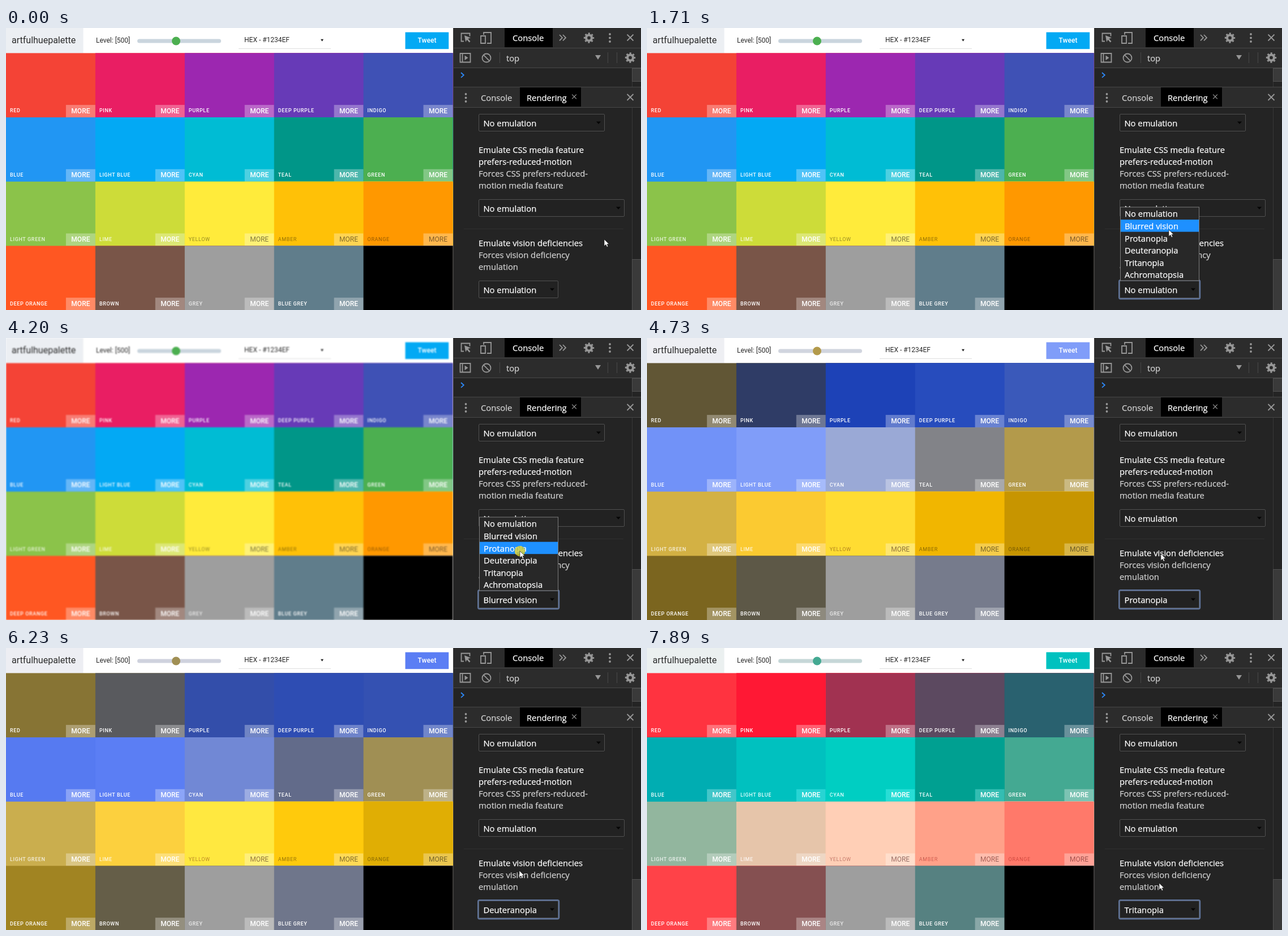
Animation of 1122x499 px, one loop 8000 ms. Source, as an HTML page:

```html
<!DOCTYPE html>
<html lang="en">
<head>
<meta charset="utf-8">
<title>Vision deficiency emulation</title>
<style>
html, body { margin: 0; width: 100%; height: 100%; overflow: hidden; background: #242424; }
svg { display: block; width: 1122px; height: 499px; }
text { white-space: pre; }
.page text { font-family: Roboto, sans-serif; font-size: 12px; fill: #2b2b2b; }
.page .name { font-size: 9px; font-weight: 500; letter-spacing: .64px; fill: #fff; }
.page .more { font-weight: 500; fill: #fff; text-anchor: middle; }
.page .soft { fill: rgba(255, 255, 255, .8); }
.page .dark { fill: rgba(0, 0, 0, .5); font-weight: 400; }
.page .name.dark { fill: rgba(0, 0, 0, .42); }
.tools text { font-family: "Open Sans", "Noto Sans", sans-serif; font-size: 14.75px; fill: #fff; stroke: #fff; stroke-width: .25; }
.tools .dim { fill: #d2d2d2; stroke: #d2d2d2; }
.icon { fill: none; stroke: #979797; stroke-width: 1.8; }
.solid { fill: #979797; }
</style>
</head>
<body>
<svg viewBox="0 0 1122 499">
  <defs id="filters"></defs>
  <rect width="790" height="499" fill="#fff"/>
  <g class="page" id="page"></g>
  <g class="tools">
    <g id="panel"></g>
    <g id="select"></g>
    <g id="menu"></g>
    <circle id="press" r="9.3" fill="#d8cf30" opacity=".8"/>
    <path id="pointer" d="M0 0V11.8L2.9 9.2 4.8 13.4 6.8 12.5 5 8.5H8.6Z" fill="#fff" stroke="#111" stroke-width=".6"/>
  </g>
</svg>
<script>
const $ = id => document.getElementById(id);
const rect = (x, y, w, h, fill, extra = '') =>
  `<rect x="${x}" y="${y}" width="${w}" height="${h}" fill="${fill}" ${extra}/>`;
const text = (x, y, s, cls = '', extra = '') =>
  `<text x="${x}" y="${y}" class="${cls}" ${extra}>${s}</text>`;
const path = (d, cls = 'icon', extra = '') => `<path d="${d}" class="${cls}" ${extra}/>`;
const circle = (x, y, r, cls = 'solid', extra = '') =>
  `<circle cx="${x}" cy="${y}" r="${r}" class="${cls}" ${extra}/>`;

// Colour vision filters
const matrices = {
  protanopia: [.152286, 1.052583, -.204868, .114503, .786281, .099216, -.003882, -.048116, 1.051998],
  deuteranopia: [.367322, .860646, -.227968, .280085, .672501, .047413, -.01182, .04294, .968881],
  tritanopia: [1.255528, -.076749, -.178779, -.078411, .930809, .147602, .004733, .691367, .3039]
};
const filter = (id, body) => `<filter id="${id}" filterUnits="userSpaceOnUse" x="0" y="0"
  width="790" height="499" color-interpolation-filters="sRGB">${body}</filter>`;
$('filters').innerHTML = filter('blurred', '<feGaussianBlur stdDeviation="1.1"/>') +
  Object.entries(matrices).map(([id, m]) => {
    const rows = [0, 3, 6].map(i => m.slice(i, i + 3).join(' ') + ' 0 0');
    return filter(id, `<feColorMatrix values="${rows.join(' ')} 0 0 0 1 0"/>`);
  }).join('');

// Colour page
const swatches = `RED F44336,PINK E91E63,PURPLE 9C27B0,DEEP PURPLE 673AB7,INDIGO 3F51B5,
BLUE 2196F3,LIGHT BLUE 03A9F4,CYAN 00BCD4,TEAL 009688,GREEN 4CAF50,
LIGHT GREEN 8BC34A,LIME CDDC39,YELLOW FFEB3B,AMBER FFC107,ORANGE FF9800,
DEEP ORANGE FF5722,BROWN 795548,GREY 9E9E9E,BLUE GREY 607D8B, 000000`.split(',');
const darkNames = ['YELLOW', 'AMBER', 'ORANGE'];
const softNames = ['LIGHT GREEN', 'LIME', 'GREY'];
const tileW = 157.9, tileH = 113.7, gridTop = 44.4, gridRight = 5 * tileW;

// Each tile runs on below its neighbours, so no seams show between them.
function tile(entry, i) {
  const name = entry.trim().slice(0, -6).trim(), color = '#' + entry.slice(-6);
  const left = i % 5 * tileW, right = left + tileW;
  const top = gridTop + (i / 5 | 0) * tileH, bottom = top + tileH;
  const box = rect(left, top, gridRight - left, 499 - top, color);
  if (!name) return box;
  const dark = darkNames.includes(name) ? ' dark' : '';
  const soft = softNames.includes(name) ? ' soft' : '';
  return box + rect(right - 52, bottom - 22, 52, 22, 'rgba(255,255,255,.3)') +
    text(left + 7, bottom - 8.7, name, 'name' + dark + soft) +
    text(right - 26, bottom - 7.4, 'MORE', 'more' + dark);
}

$('page').innerHTML =
  rect(0, 0, 790, 499, '#fff') +
  rect(0, 0, 136.5, 44.4, '#eceff3') +
  text(10, 27.3, 'artfulhuepalette', '', 'style="font-size:16px"') +
  text(159, 26, 'Level: [500]') +
  rect(232, 19.5, 148, 7, '#cad5de', 'rx="3.5"') +
  circle(300.5, 23, 7.5, '', 'fill="#4caf50"') +
  text(421, 25.3, 'HEX - #1234EF') +
  path('M556 19.8h5l-2.5 4z', '', 'fill="#222"') +
  rect(411, 36, 163, 1, '#dedede') +
  rect(705.5, 7.5, 76.7, 29.7, '#03a9f4') +
  text(744, 26.2, 'Tweet', 'more') +
  swatches.map(tile).join('');

// Developer tools
const gear = (x, y) =>
  circle(x, y, 5, 'icon', 'style="stroke-width:4.2"') +
  circle(x, y, 7.8, 'icon', 'style="stroke-width:2.8" stroke-dasharray="3.06" stroke-dashoffset="1.53"');
const dots = (x, y) => [-6.5, 0, 6.5].map(d => circle(x, y + d, 1.9)).join('');
const cross = (x, y, r, width = 1.8) =>
  path(`M${x - r} ${y - r}l${2 * r} ${2 * r}m0 ${-2 * r}l${-2 * r} ${2 * r}`, 'icon', `style="stroke-width:${width}"`);
const arrow = (x, y) => path(`M${x - 4} ${y - 2}h8l-4 4.5z`, '', 'fill="#050505"');
const select = (x, y, w, label) =>
  rect(x + .5, y + .5, w - 1, 30, '#222', 'rx="1.5" stroke="#505050"') +
  text(x + 8.5, y + 22, label) + arrow(x + w - 11, y + 15.5);
const lines = (x, y, list, bright) =>
  list.map((s, i) => text(x, y + i * 20.9, s, i < bright ? '' : 'dim')).join('');
const line = (x, y, w, h, color = '#484848') => rect(x, y, w, h, color);

$('panel').innerHTML =
  rect(790, 0, 332, 499, '#242424') +
  rect(790, 0, 332, 70, '#2c2c2c') + rect(790, 105, 332, 35, '#2c2c2c') +
  [35, 70, 104, 140].map(y => line(790, y, 332, 1)).join('') +
  line(790, 0, 1, 499, '#3c3c3c') +
  rect(881, 0, 85, 34, '#000') + rect(908, 105, 108, 34, '#000') +
  // top toolbar
  path('M809 23.5h-4.5v-14h15v5') +
  path('M810 13l11 4.6-4.6 1.5 4.1 4.6-2 1.9-4-4.8-2.3 4z', 'solid') +
  path('M844 12V8h13v19h-7M839 14h8v13h-8z') +
  text(895, 23.4, 'Console') +
  path('M978 12l5 5.2-5 5.2m6-10.4l5 5.2-5 5.2') +
  gear(1030, 17.5) + dots(1067, 17.5) + cross(1103, 17, 5.5) +
  // console toolbar
  path('M802.5 45h18v15.5h-18zM806.5 45v15.5') +
  path('M810.5 48.5v8.5l6-4.25z', 'solid') +
  circle(849, 53, 7.5, 'icon') + path('M843.7 47.7l10.6 10.6') +
  [872, 1063, 1079].map(x => line(x, 43, 1, 19)).join('') +
  text(884, 58.6, 'top', 'dim') + path('M1041 48h10l-5 8z', 'solid') + gear(1103, 52.5) +
  path('M804 79l4.8 4.3-4.8 4.3', 'icon', 'style="stroke:#2d8cff"') +
  // drawer tabs
  dots(812.5, 123.5) + text(839, 129.2, 'Console', 'dim') + text(920, 129.2, 'Rendering') +
  cross(1004, 121.5, 3.8, 1.2) + cross(1103, 122.5, 5.5) +
  // scrollbars
  line(1106, 71, 1, 33, '#383838') + line(1106, 141, 1, 358, '#383838') +
  rect(1106.5, 71.5, 16, 23, '#3a3a3a', 'stroke="#505050"') +
  rect(1106.5, 409.5, 16, 90, '#3a3a3a', 'stroke="#505050"') +
  // rendering settings
  select(835, 152, 223, 'No emulation') +
  lines(835, 221.2, ['Emulate CSS media feature', 'prefers-reduced-motion',
    'Forces CSS prefers-reduced-', 'motion media feature'], 2) +
  select(835, 303, 258, 'No emulation') +
  line(809, 355, 282, 1, '#303030') +
  lines(835, 386.2, ['Emulate vision deficiencies', 'Forces vision deficiency', 'emulation'], 1);

const options = ['No emulation', 'Blurred vision', 'Protanopia', 'Deuteranopia', 'Tritanopia', 'Achromatopsia'];
const modes = ['', 'blurred', 'protanopia', 'deuteranopia', 'tritanopia'];
const menuTop = 317.5, itemH = 21.6;

$('select').innerHTML = select(835, 447, 141, '') +
  rect(834.2, 446.3, 142.8, 33, 'none', 'id="ring" rx="2.5" stroke="#5f7399" stroke-width="2.4"');
const label = $('select').querySelector('text');
$('menu').innerHTML = rect(836.5, menuTop - .5, 139, 130, '#282828', 'stroke="#7c7c7c"') +
  rect(837, 0, 138, 21.5, '#1e90ff', 'id="bar"') +
  options.map((s, i) => text(844, menuTop + 16.8 + i * itemH, s)).join('');

// Timeline: pointer moves are [start, end, steps, x, y]
const loop = 8000;
const moves = [
  [110, 750, 9, 920, 464],
  [1140, 1710, 8, 922, 357], [1780, 1780, 1, 922, 355],
  [2440, 2740, 5, 936, 422], [2820, 3200, 6, 905, 461],
  [3390, 4110, 10, 908, 377],
  [4730, 5200, 7, 906, 465], [5280, 5510, 4, 906, 445],
  [5600, 6050, 7, 907, 394],
  [6460, 7010, 8, 906, 459],
  [7240, 7720, 7, 905, 416]
];
const opened = [750, 3200, 5200, 7010];
const picked = [2040, 4340, 6230, 7890];
const presses = [[1970, 2040], [4200, 4340]];
const focusAt = 670;
const ease = k => k * k * (3 - 2 * k);
const count = (times, t) => times.filter(at => t >= at).length;
const show = (id, on) => $(id).setAttribute('visibility', on ? 'visible' : 'hidden');

function pointerAt(t) {
  let x = 1057, y = 374;
  for (const [from, to, n, tx, ty] of moves) {
    if (t < from) break;
    const step = n > 1 ? Math.min(n, 1 + Math.floor((t - from) / (to - from) * (n - 1) + .05)) : 1;
    const k = ease(step / n);
    x += (tx - x) * k;
    y += (ty - y) * k;
  }
  return [x, y];
}

function render(t) {
  const [x, y] = pointerAt(t);
  const mode = count(picked, t);
  const item = Math.floor((y - menuTop) / itemH);
  const active = item >= 0 && item < options.length ? item : mode;
  if (mode) $('page').setAttribute('filter', `url(#${modes[mode]})`);
  else $('page').removeAttribute('filter');
  label.textContent = options[mode];
  show('ring', t >= focusAt);
  show('menu', count(opened, t) > mode);
  $('bar').setAttribute('y', menuTop + active * itemH);
  show('press', presses.some(([from, to]) => t >= from && t < to));
  for (const id of ['press', 'pointer']) $(id).setAttribute('transform', `translate(${x} ${y})`);
}

const start = performance.now();
function frame() {
  render((performance.now() - start) % loop);
  requestAnimationFrame(frame);
}
frame();
</script>
</body>
</html>
```
